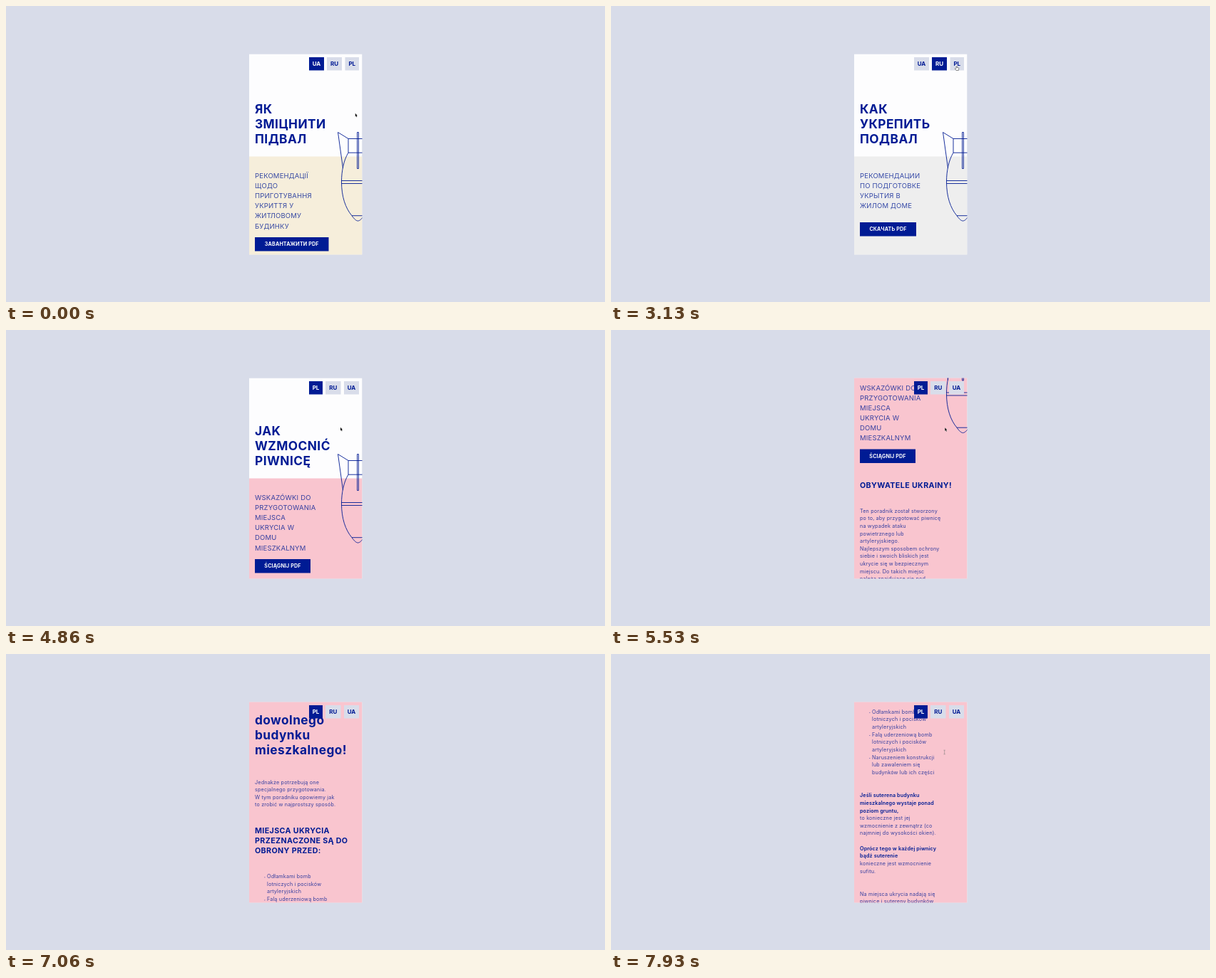
Animation of 840 by 416 pixels, one loop 8000 ms. Source, as an HTML page with a canvas:

```html
<!DOCTYPE html>
<html lang="uk">
<head>
<meta charset="utf-8">
<title>Language switch and scroll</title>
<style>
  html, body { margin: 0; width: 100%; height: 100%; overflow: hidden; background: #d8dce9; }
  canvas { display: block; width: 840px; height: 416px; }
</style>
</head>
<body>
<canvas id="stage"></canvas>
<script>
const W = 840, H = 416, LOOP = 8000, FPS = 15;
const NAVY = '#001b94', SOFT = 'rgba(0, 27, 148, .78)', PALE = '#d9ddea', BACK = '#d8dce9', WHITE = '#fdfdfe';
const CARD = { x: 341, y: 67.5, w: 158.5, h: 282 };
const LEFT = 349, SPLIT = 211.5;
const RU_CLICK = 33, PL_CLICK = 50, TEXT_HOVER = 105;

const canvas = document.getElementById('stage');
const ctx = canvas.getContext('2d');
const dpr = window.devicePixelRatio || 1;
canvas.width = W * dpr;
canvas.height = H * dpr;

// weight, size, line step, tracking in em, colour
const STYLE = {
  title: [700, 17.3, 21.2, 0.025, NAVY],
  lead: [400, 9.5, 14.1, 0.02, SOFT],
  head: [700, 10.7, 14.1, 0.035, NAVY],
  body: [400, 7.2, 10.6, 0.024, SOFT],
  list: [400, 7.2, 10.7, 0.024, SOFT],
  note: [400, 7.2, 10.65, 0.024, SOFT],
  strong: [600, 7.15, 10.65, 0.02, NAVY],
  button: [700, 7.15, 0, 0.02, WHITE],
  tab: [700, 8, 0, 0, NAVY]
};

const FIRST_TABS = [['UA', 425, 21], ['RU', 450, 21], ['PL', 475.5, 19.5]];
const POLISH_TABS = [['PL', 425, 19], ['RU', 448, 21.5], ['UA', 474, 21]];

const PAGES = {
  UA: {
    color: '#f6eedb', tabs: FIRST_TABS,
    title: ['ЯК', 'ЗМІЦНИТИ', 'ПІДВАЛ'],
    lead: ['РЕКОМЕНДАЦІЇ', 'ЩОДО', 'ПРИГОТУВАННЯ', 'УКРИТТЯ У', 'ЖИТЛОВОМУ', 'БУДИНКУ'],
    button: ['ЗАВАНТАЖИТИ PDF', 325, 103.5]
  },
  RU: {
    color: '#eeeeee', tabs: FIRST_TABS,
    title: ['КАК', 'УКРЕПИТЬ', 'ПОДВАЛ'],
    lead: ['РЕКОМЕНДАЦИИ', 'ПО ПОДГОТОВКЕ', 'УКРЫТИЯ В', 'ЖИЛОМ ДОМЕ'],
    button: ['СКАЧАТЬ PDF', 304, 79]
  },
  PL: {
    color: '#f9c5cf', tabs: POLISH_TABS,
    title: ['JAK', 'WZMOCNIĆ', 'PIWNICĘ'],
    lead: ['WSKAZÓWKI DO', 'PRZYGOTOWANIA', 'MIEJSCA', 'UKRYCIA W', 'DOMU', 'MIESZKALNYM'],
    button: ['ŚCIĄGNIJ PDF', 325, 78]
  }
};

// style, first baseline, lines, optional x
const ARTICLE = [
  ['head', 379.5, ['OBYWATELE UKRAINY!']],
  ['body', 414.3, ['Ten poradnik został stworzony', 'po to, aby przygotować piwnicę',
    'na wypadek ataku', 'powietrznego lub', 'artyleryjskiego.',
    'Najlepszym sposobem ochrony', 'siebie i swoich bliskich jest', 'ukrycie się w bezpiecznym',
    'miejscu. Do takich miejsc', 'należą znajdujące się pod', 'ziemią: suterena i piwnica.']],
  ['title', 570, ['dowolnego', 'budynku', 'mieszkalnego!']],
  ['body', 653.6, ['Jednakże potrzebują one', 'specjalnego przygotowania.',
    'W tym poradniku opowiemy jak', 'to zrobić w najprostszy sposób.']],
  ['head', 723, ['MIEJSCA UKRYCIA', 'PRZEZNACZONE SĄ DO', 'OBRONY PRZED:']],
  ['list', 786, ['Odłamkami bomb', 'lotniczych i pocisków', 'artyleryjskich',
    'Falą uderzeniową bomb', 'lotniczych i pocisków', 'artyleryjskich',
    'Naruszeniem konstrukcji', 'lub zawaleniem się', 'budynków lub ich części'], 366],
  ['strong', 903.7, ['Jeśli suterena budynku', 'mieszkalnego wystaje ponad', 'poziom gruntu,']],
  ['note', 935.65, ['to konieczne jest jej', 'wzmocnienie z zewnątrz (co', 'najmniej do wysokości okien).']],
  ['strong', 978.25, ['Oprócz tego w każdej piwnicy', 'bądź suterenie']],
  ['note', 999.55, ['konieczne jest wzmocnienie', 'sufitu.', '', '',
    'Na miejsca ukrycia nadają się', 'piwnice i sutereny budynków']]
];

// Keys are [step, value...] with FPS steps per second
const SCROLL = [[0, 0], [70, 0], [73, 3], [83, 157.5], [96, 423], [106, 471], [108, 471], [119, 702.5], [120, 712]];
const POINTER = [[0, 489.8, 150.8], [12, 487, 140], [28, 461, 83], [38, 461, 83], [46, 485, 84.5],
  [53, 485, 84.5], [66, 469, 136.8], [73, 469, 136.8], [83, 468.3, 137.2], [106, 469.5, 138], [120, 467.5, 138]];

// Monotone cubic interpolation through the keys
function track(keys, at, col = 1) {
  const last = keys.length - 1;
  const slope = i => (keys[i + 1][col] - keys[i][col]) / (keys[i + 1][0] - keys[i][0]);
  const tangent = i => {
    if (i === 0) return slope(0);
    if (i === last) return slope(last - 1);
    const a = slope(i - 1), b = slope(i);
    return a * b <= 0 ? 0 : 2 * a * b / (a + b);
  };
  let i = 0;
  while (i < last - 1 && at >= keys[i + 1][0]) i++;
  const span = keys[i + 1][0] - keys[i][0];
  const u = Math.min(1, (at - keys[i][0]) / span), v = 1 - u;
  return keys[i][col] * v * v * (1 + 2 * u) + keys[i + 1][col] * u * u * (3 - 2 * u)
    + span * u * v * (tangent(i) * v - tangent(i + 1) * u);
}

function rect(color, x, y, w, h) {
  ctx.fillStyle = color;
  ctx.fillRect(x, y, w, h);
}

function text(style, lines, x, y, align = 'left', fill) {
  const [weight, size, step, tracking, color] = STYLE[style];
  ctx.font = `${weight} ${size}px Inter, "Open Sans", sans-serif`;
  ctx.letterSpacing = `${size * tracking}px`;
  ctx.fillStyle = fill || color;
  ctx.textAlign = align;
  lines.forEach((line, i) => ctx.fillText(line, x, y + i * step));
}

const BOMB = new Path2D(`
  M472.5 228 L465.5 177.5 L480 186.5 H507 M480 186.5 V206.2 H507
  M492.6 177.5 H494.4 V228.5 H492.6 Z
  M480 206.2 C473.5 217 470.5 232 470.5 247 C470.5 268 476 284 485 294.7
  C488 299 491 302 493.5 302 C496 302 499 299 502 294.7
  M470.5 245.5 H507 M470.5 249.5 H507 M485 294.7 H502`);

function drawPage(page, scroll) {
  ctx.save();
  ctx.beginPath();
  ctx.rect(CARD.x, CARD.y, CARD.w, CARD.h);
  ctx.clip();
  rect(WHITE, CARD.x, CARD.y, CARD.w, CARD.h);
  ctx.translate(0, -scroll);
  rect(page.color, CARD.x, SPLIT, CARD.w, 1000);

  ctx.strokeStyle = NAVY;
  ctx.lineWidth = 0.9;
  ctx.stroke(BOMB);

  text('title', page.title, LEFT, 150.5);
  text('lead', page.lead, LEFT, 242);
  const [label, top, width] = page.button;
  rect(NAVY, LEFT, top, width, 19.5);
  text('button', [label], LEFT + width / 2, top + 12.4, 'center');

  if (page === PAGES.PL) {
    for (const [style, y, lines, x = LEFT] of ARTICLE) {
      text(style, lines, x, y);
      if (style === 'list') {
        for (let i = 0; i < lines.length; i += 3) {
          rect(SOFT, 362.4, y - 1.6 + i * STYLE.list[2], 0.9, 0.9);
        }
      }
    }
  }
  ctx.restore();
}

function drawTabs(page) {
  for (const [name, x, w] of page.tabs) {
    const active = PAGES[name] === page;
    rect(active ? NAVY : PALE, x, 72, w, 18.5);
    text('tab', [name], x + w / 2, 84, 'center', active ? WHITE : NAVY);
  }
}

const ARROW = new Path2D('M0 0 V4.6 L1 3.7 L1.8 5.5 L2.5 5.2 L1.8 3.4 H3.1 Z');
const HAND = new Path2D(`M-.8 3 V.5 Q-.2 -.3 .4 .5 V2 L2.4 2.5 Q3 2.7 2.9 3.5
  L2.3 6 H-1 L-2.7 3.6 Q-2.2 2.7 -1.4 3.5 Z`);
const BEAM = new Path2D('M-1.2 -2.8 H1.2 M0 -2.8 V2.8 M-1.2 2.8 H1.2');

function drawPointer(page, step) {
  const x = track(POINTER, step, 1), y = track(POINTER, step, 2);
  const onTab = y > 72 && y < 90.5 && page.tabs.some(t => x >= t[1] && x <= t[1] + t[2]);
  ctx.save();
  ctx.translate(x, y);
  ctx.lineWidth = 0.5;
  if (onTab) {
    ctx.fillStyle = '#fff';
    ctx.strokeStyle = '#222';
    ctx.fill(HAND);
    ctx.stroke(HAND);
  } else if (step >= TEXT_HOVER) {
    ctx.strokeStyle = '#777';
    ctx.stroke(BEAM);
  } else {
    ctx.strokeStyle = '#fff';
    ctx.stroke(ARROW);
    ctx.fillStyle = '#111';
    ctx.fill(ARROW);
  }
  ctx.restore();
}

function draw(ms) {
  const step = Math.floor((ms % LOOP + 7) * FPS / 1000) % (LOOP * FPS / 1000);
  const page = step < RU_CLICK ? PAGES.UA : step < PL_CLICK ? PAGES.RU : PAGES.PL;
  ctx.setTransform(dpr, 0, 0, dpr, 0, 0);
  rect(BACK, 0, 0, W, H);
  drawPage(page, track(SCROLL, step));
  drawTabs(page);
  drawPointer(page, step);
}

let start;
function tick(now) {
  start ??= now;
  draw(now - start);
  requestAnimationFrame(tick);
}
draw(0);
requestAnimationFrame(tick);
</script>
</body>
</html>
```
